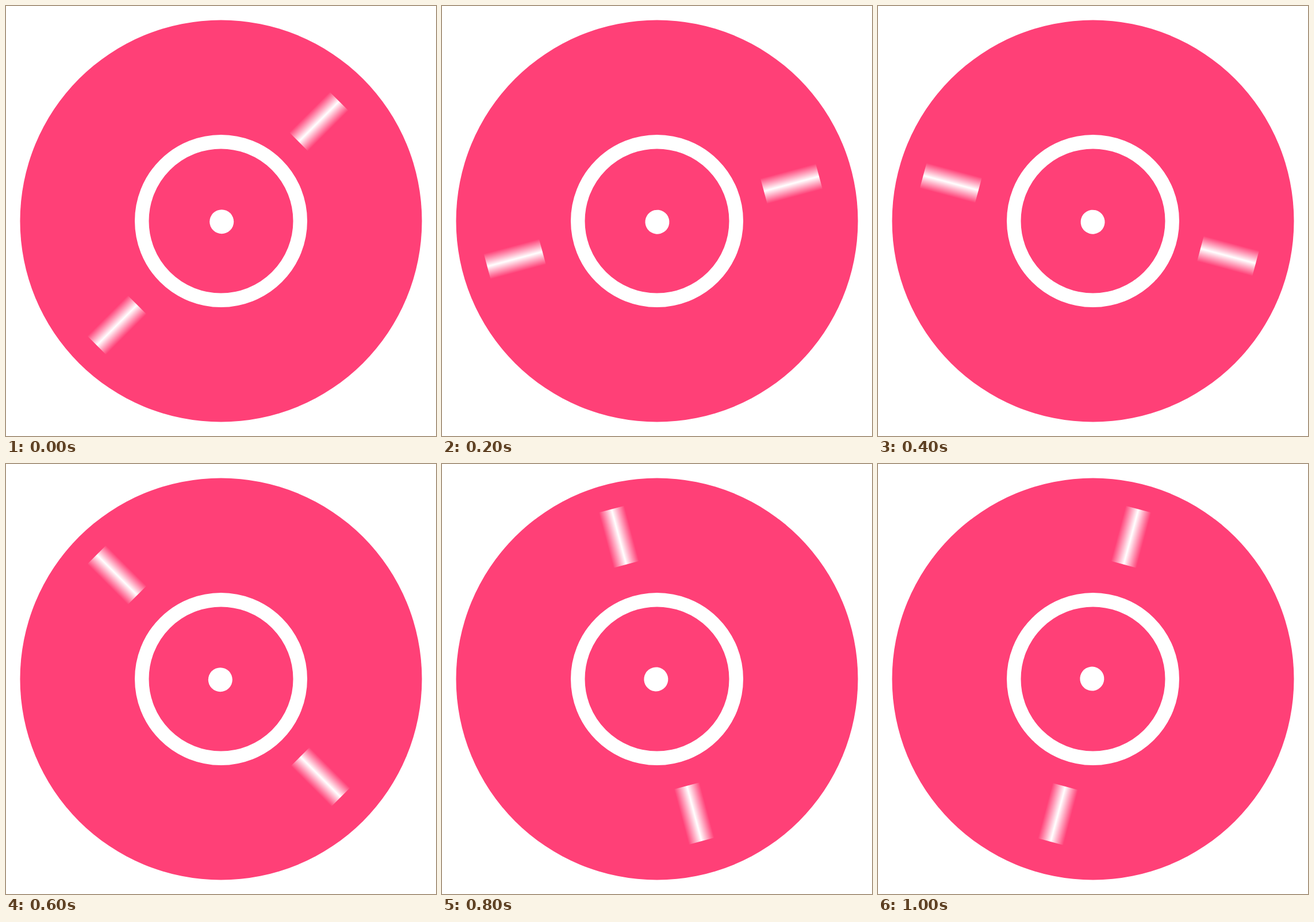
An HTML page that plays this animation: 748 by 748 pixels, repeating every 1.1 s.

```html
<!DOCTYPE html>
<html lang="en">
<head>
<meta charset="utf-8">
<title>Spinning record</title>
<style>
  html, body { margin: 0; height: 100%; overflow: hidden; background: #fff; }
  svg { display: block; width: 100vw; height: 100vh; }
</style>
</head>
<body>
<svg viewBox="-374 -374 748 748">
  <defs>
    <linearGradient id="shine" x2="0" y2="1">
      <stop stop-color="#fff" stop-opacity="0"/>
      <stop offset=".5" stop-color="#fff"/>
      <stop offset="1" stop-color="#fff" stop-opacity="0"/>
    </linearGradient>
  </defs>
  <circle r="349.5" fill="#ff4077"/>
  <circle r="137.75" fill="none" stroke="#fff" stroke-width="24.5"/>
  <g id="spin" transform="rotate(-45)">
    <rect x="193" y="-25" width="99.5" height="46" fill="url(#shine)"/>
    <rect x="-305.75" y="-23" width="99.5" height="46" fill="url(#shine)"/>
    <circle cy="1.7" r="21" fill="#fff"/>
  </g>
</svg>
<script>
  const LOOP = 1100, STEP = 100, TURN = 15, START = -45;
  const spin = document.getElementById('spin');

  // The record turns in hard steps and jumps back at the end of the loop.
  function draw() {
    const step = Math.floor(performance.now() % LOOP / STEP);
    spin.setAttribute('transform', `rotate(${START + step * TURN})`);
    requestAnimationFrame(draw);
  }
  draw();
</script>
</body>
</html>
```
